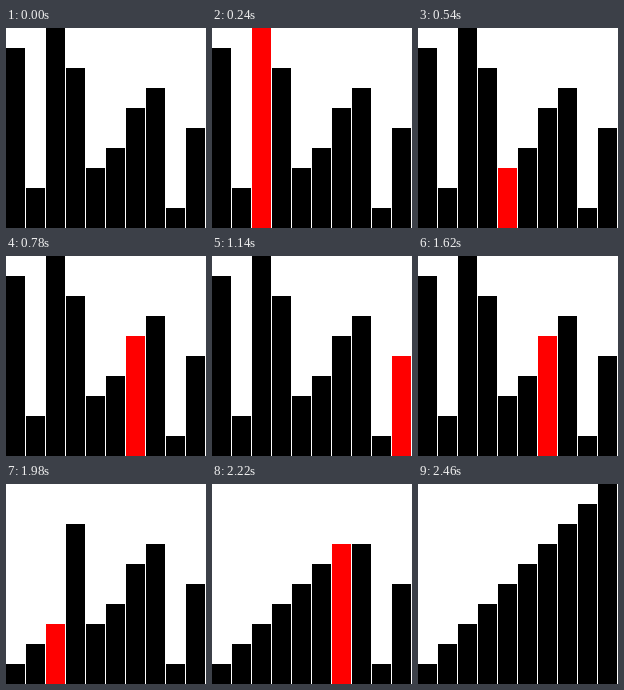
An HTML page with a canvas that plays this animation: 200 px wide and 200 px high, repeating every 4460 ms.

```html
<!DOCTYPE html>
<html lang="en">
<head>
<meta charset="utf-8">
<title>Pigeonhole sort</title>
<style>
  html, body { margin: 0; width: 100%; height: 100%; overflow: hidden; background: #fff; }
  canvas { display: block; }
</style>
</head>
<body>
<canvas id="stage" width="200" height="200"></canvas>
<script>
const ctx = document.getElementById('stage').getContext('2d');
const STEP = 60, HOLD = 2000, UNIT = 20;

// Run the sort once; every array access becomes one step of the animation.
function trace(list) {
  const steps = [];
  const log = active => steps.push({ bars: [...list], active });
  const read = i => { log(i); return list[i]; };
  const write = (i, v) => { list[i] = v; log(i); };

  log(-1);
  let min = read(0), max = min;
  for (let i = 1; i < list.length; i++) {
    if (read(i) < min) min = read(i);
    else if (read(i) > max) max = read(i);
  }

  const holes = new Array(max - min + 1).fill(0);
  for (let i = 0; i < list.length; i++) holes[read(i) - min]++;

  let next = 0;
  holes.forEach((count, h) => {
    while (count-- > 0) write(next++, h + min);
  });
  log(-1);
  return steps;
}

const steps = trace([9, 2, 10, 8, 3, 4, 6, 7, 1, 5]);
const last = steps.length - 1;
const LOOP = last * STEP + HOLD;

function draw({ bars, active }) {
  ctx.fillStyle = '#fff';
  ctx.fillRect(0, 0, 200, 200);
  bars.forEach((v, i) => {
    ctx.fillStyle = i === active ? '#f00' : '#000';
    ctx.fillRect(i * UNIT, 200 - v * UNIT, UNIT - 1, v * UNIT);
  });
}

function tick() {
  const t = performance.now() % LOOP;
  draw(steps[Math.min(last, Math.floor(t / STEP))]);
  requestAnimationFrame(tick);
}
tick();
</script>
</body>
</html>
```
